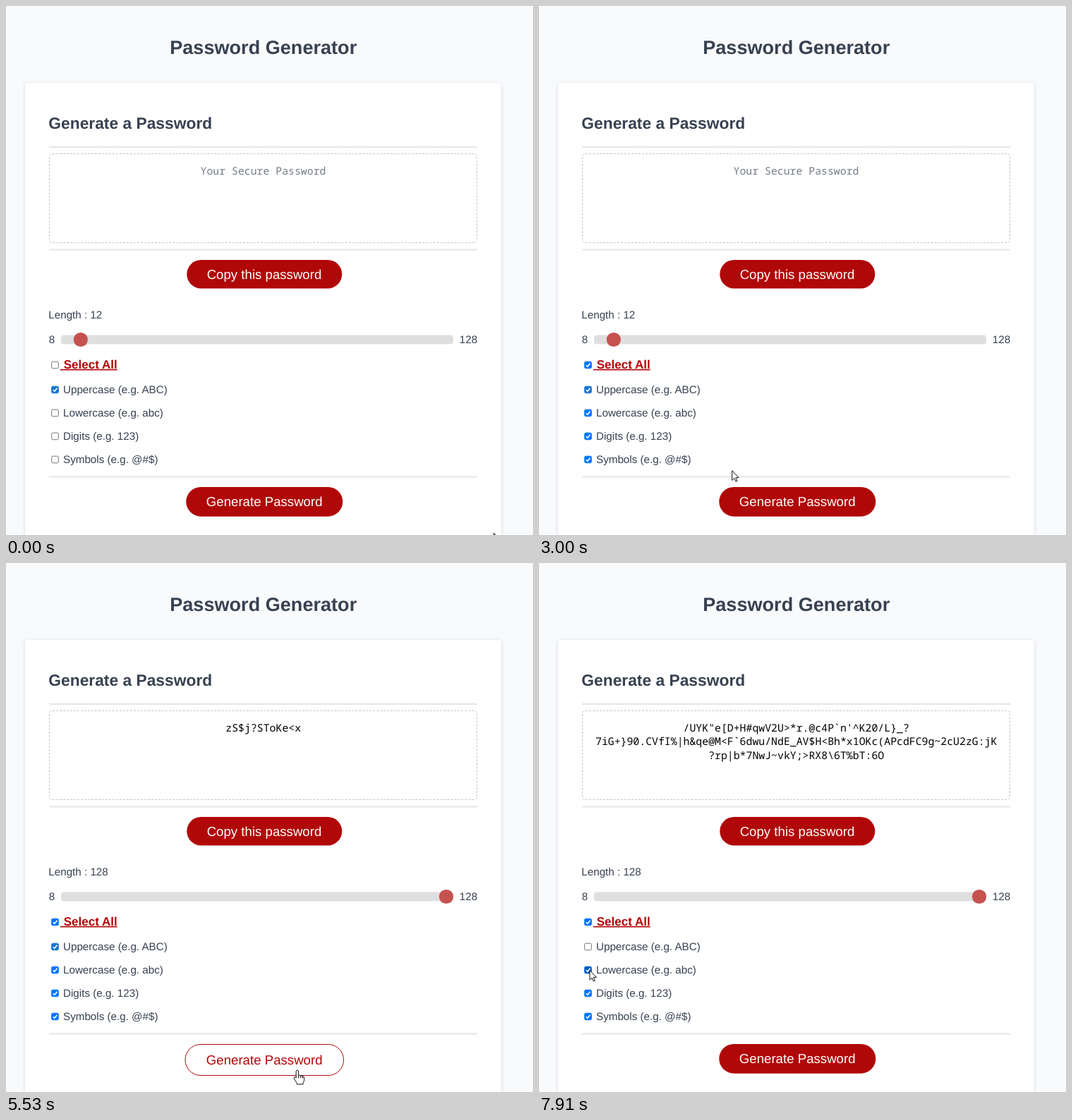
These frames come from a looping animation (747x750 px, 8 s). An HTML page:

```html
<!DOCTYPE html>
<html lang="en">
<head>
<meta charset="utf-8">
<title>Password Generator</title>
<style>
html, body { margin: 0; width: 100%; height: 100%; overflow: hidden; }
.stage { position: relative; width: 100%; height: 100%; overflow: hidden; background: #f8fafc; }
.card, .field, svg { position: absolute; box-sizing: border-box; }
.card { left: 27px; top: 109px; bottom: 0; width: 675px; border-radius: 4px 4px 0 0; background: #fff;
  box-shadow: 0 1px 5px rgba(50, 60, 80, .17); }
.field { left: 61px; top: 209px; width: 607px; height: 127px; border: 1px dashed #c4c4c4; border-radius: 5px; }
svg { left: 0; top: 0; width: 100%; height: 100%; fill: #374151; text-rendering: geometricPrecision;
  font: 15.2px "Liberation Sans", Arial, sans-serif; }
.mid { text-anchor: middle; }
.mono { font: 14.83px "Noto Sans Mono", Consolas, monospace; text-anchor: middle; fill: #000; }
.btn { font-size: 18.65px; text-anchor: middle; }
.red { fill: #b00808; }
.white { fill: #fff; }
.all { font-size: 17px; font-weight: bold; fill: #b00808;
  text-decoration: underline; text-decoration-thickness: 1.4px; text-underline-offset: 1.8px; }
.cursor path { fill: #fff; stroke: #111; stroke-width: 1; stroke-linejoin: round; }
</style>
</head>
<body>
<div class="stage">
<div class="card"></div>
<div class="field"></div>
<svg viewBox="0 0 747 750">
  <text class="mid" x="364.7" y="68" font-size="27.1" font-weight="bold">Password Generator</text>
  <text x="60.3" y="173.7" font-size="22.8" font-weight="bold">Generate a Password</text>
  <path d="M61 200H668M61 345.5H668M61 667.5H668" stroke="#e6e6e6" stroke-width="1.9"/>

  <text class="mono" id="hint" x="364.5" y="238.5" style="fill:#757b86">Your Secure Password</text>
  <text class="mono" id="short" x="364.7" y="238.5">zS$j?SToKe&lt;x</text>
  <g class="mono" id="long">
    <text x="364.7" y="238.5">/UYK"e[D+H#qwV2U&gt;*r.@c4P`n'^K20/L}_?</text>
    <text x="364.7" y="258">7iG+}90.CVfI%|h&amp;qe@M&lt;F`6dwu/NdE_AV$H&lt;Bh*x1OKc(APcdFC9g~2cU2zG:jK</text>
    <text x="364.7" y="277.5">?rp|b*7NwJ~vkY;&gt;RX8\6T%bT:6O</text>
  </g>

  <rect class="red" x="256.3" y="360" width="220" height="40.5" rx="20.25"/>
  <text class="btn white" x="366" y="386.6">Copy this password</text>

  <text x="60.3" y="443" id="length"></text>
  <text x="60.8" y="478">8</text>
  <text x="642.8" y="478">128</text>
  <rect x="78" y="466.5" width="556" height="13" rx="4" fill="#dedfde"/>
  <circle id="thumb" cy="473" r="10.1" fill="#c5524f"/>

  <g id="boxes"></g>
  <text class="all" x="77" y="513.8">&nbsp;Select All</text>
  <text x="81" y="549.3">Uppercase (e.g. ABC)</text>
  <text x="81" y="582.3">Lowercase (e.g. abc)</text>
  <text x="81" y="615.3">Digits (e.g. 123)</text>
  <text x="81" y="648">Symbols (e.g. @#$)</text>

  <g id="idle">
    <rect class="red" x="255.3" y="682" width="222" height="41.7" rx="20.8"/>
    <text class="btn white" x="366.2" y="709.2">Generate Password</text>
  </g>
  <g id="hover">
    <rect x="254" y="682.5" width="224.6" height="44" rx="22" fill="#fff" stroke="#b00808"/>
    <text class="btn red" x="366.2" y="711">Generate Password</text>
  </g>

  <circle id="click" r="11" fill="#fff50a" opacity=".6"/>
  <g class="cursor" id="cursor">
    <path id="arrow" d="M.5 .5V14.2L3.6 11.2 5.8 16 7.8 15.1 5.7 10.4H10Z"/>
    <g id="beam">
      <path d="M-3-7H3M-3 7H3M0-7V7" style="stroke:#fff;stroke-width:2.6"/>
      <path d="M-3.5-7H-.8L0-6.2 .8-7H3.5M-3.5 7H-.8L0 6.2 .8 7H3.5M0-6.2V6.2" style="fill:none"/>
    </g>
    <g id="hand">
      <path d="M-1.8 1.8a1.7 1.7 0 0 1 3.4 0V7.5q2.6-1 3.2 .6 2.2-.6 2.7 .9 2.2-.3 2.2 1.8V13.5q0 2.5-1.6 4.3V20H-.6V18.6Q-2.2 16.5-4.6 11.8-5.4 9.8-3.8 9.6-2.8 9.6-1.8 11.2Z"/>
      <path d="M1.6 7.5v4M4.8 8.1v3.4M7.5 9v2.5"/>
    </g>
  </g>
</svg>
</div>
<script>
const LOOP = 8000, STEP = 67, TAP = 70;
const SELECT = 2370, FIRST = 3430, GRAB = 4510, DROP = 5120, SECOND = 5810, UNCHECK = 7560;
const home = { x: 691, y: 747 };

// Where the pointer glides: start, end, x, y
const glides = [
  [70, 260, 261, 214],
  [460, 530, 255, 202],
  [1190, 1480, 412, 262],
  [1480, 1890, 79, 513],
  [2020, 2230, 72, 513],
  [SELECT + TAP, 3290, 324, 695],
  [3490, 4170, 132, 474],
  [4240, 4450, 111, 474],
  [GRAB, 4920, 683, 506],
  [DROP, 5460, 413, 719],
  [5580, 5670, 410, 700],
  [6530, 7280, 80, 541],
  [7350, 7490, 72, 543],
  [UNCHECK + TAP, 7910, 71.5, 577]
];

const $ = id => document.getElementById(id);
const show = (id, on) => { $(id).style.display = on ? '' : 'none'; };
const clamp = (v, lo, hi) => Math.max(lo, Math.min(hi, v));
const mix = (a, b, f) => a + (b - a) * f;
const ease = u => u < .5 ? 4 * u ** 3 : 1 - 4 * (1 - u) ** 3;
const within = (p, x0, y0, x1, y1) => p.x >= x0 && p.x <= x1 && p.y >= y0 && p.y <= y1;
const onButton = p => within(p, 254, 682, 479, 727);
const rowY = i => i ? 511 + 33 * i : 509;
const onRow = (p, i) => within(p, 63, rowY(i) - 9, 160, rowY(i) + 9);

function pointer(t) {
  let p = home;
  for (const [from, to, x, y] of glides) {
    if (t < from) break;
    const steps = Math.floor((t - from) / STEP);
    const f = ease(clamp(steps * STEP / (to - from), 0, 1));
    p = { x: mix(p.x, x, f), y: mix(p.y, y, f) };
  }
  return p;
}

function shape(p, dragging, row) {
  if (dragging || onButton(p) || within(p, 78, 463, 634, 484)) return 'hand';
  const onText = row >= 0 && p.x > 76;
  return onText || within(p, 61, 209, 668, 336) ? 'beam' : 'arrow';
}

// The slider trails the pointer by one step
function sliderValue(t) {
  if (t < GRAB + TAP) return 12;
  const x = pointer(Math.min(t, DROP) - STEP).x;
  return clamp(8 + Math.round((x - 88) / 536 * 120), 8, 128);
}

function checkbox(y, on, over, tint) {
  const fill = on ? (over ? '#005cc8' : tint) : '#fff';
  const edge = on ? fill : over ? '#4f4f4f' : '#767676';
  const tick = on ? `<path d="M66.8 ${y + .2}l2 2.1 3.7-4.6" fill="none" stroke="#fff" stroke-width="1.6"/>` : '';
  return `<rect x="64.7" y="${y - 4.8}" width="9.6" height="9.6" rx="1.8" fill="${fill}" stroke="${edge}"/>${tick}`;
}

function draw(time) {
  const t = time % LOOP + 10;
  const p = pointer(t);
  const rows = [0, 1, 2, 3, 4];
  const row = rows.find(i => onRow(p, i)) ?? -1;
  const dragging = t >= GRAB && t < DROP;

  show('hint', t < FIRST + TAP);
  show('short', t >= FIRST + TAP && t < SECOND + 60);
  show('long', t >= SECOND + 60);

  const value = sliderValue(t);
  $('length').textContent = 'Length : ' + value;
  $('thumb').setAttribute('cx', 88 + (value - 8) / 120 * 536);

  $('boxes').innerHTML = rows.map(i => {
    const on = i === 1 ? t < UNCHECK + TAP : t >= SELECT + TAP;
    return checkbox(rowY(i), on, i === row, i === 1 ? '#1a73d6' : '#0075ff');
  }).join('');

  // The button reacts late when the pointer leaves
  const hovered = onButton(p) || onButton(pointer(t - 2 * STEP));
  show('hover', hovered);
  show('idle', !hovered);

  const kind = shape(p, dragging, row);
  for (const id of ['arrow', 'beam', 'hand']) show(id, id === kind);
  for (const id of ['cursor', 'click']) $(id).setAttribute('transform', `translate(${p.x} ${p.y})`);
  show('click', dragging || [SELECT, FIRST, SECOND, UNCHECK].some(s => t >= s && t < s + TAP));
}

const start = performance.now();
function tick() {
  draw(performance.now() - start);
  requestAnimationFrame(tick);
}
tick();
</script>
</body>
</html>
```
